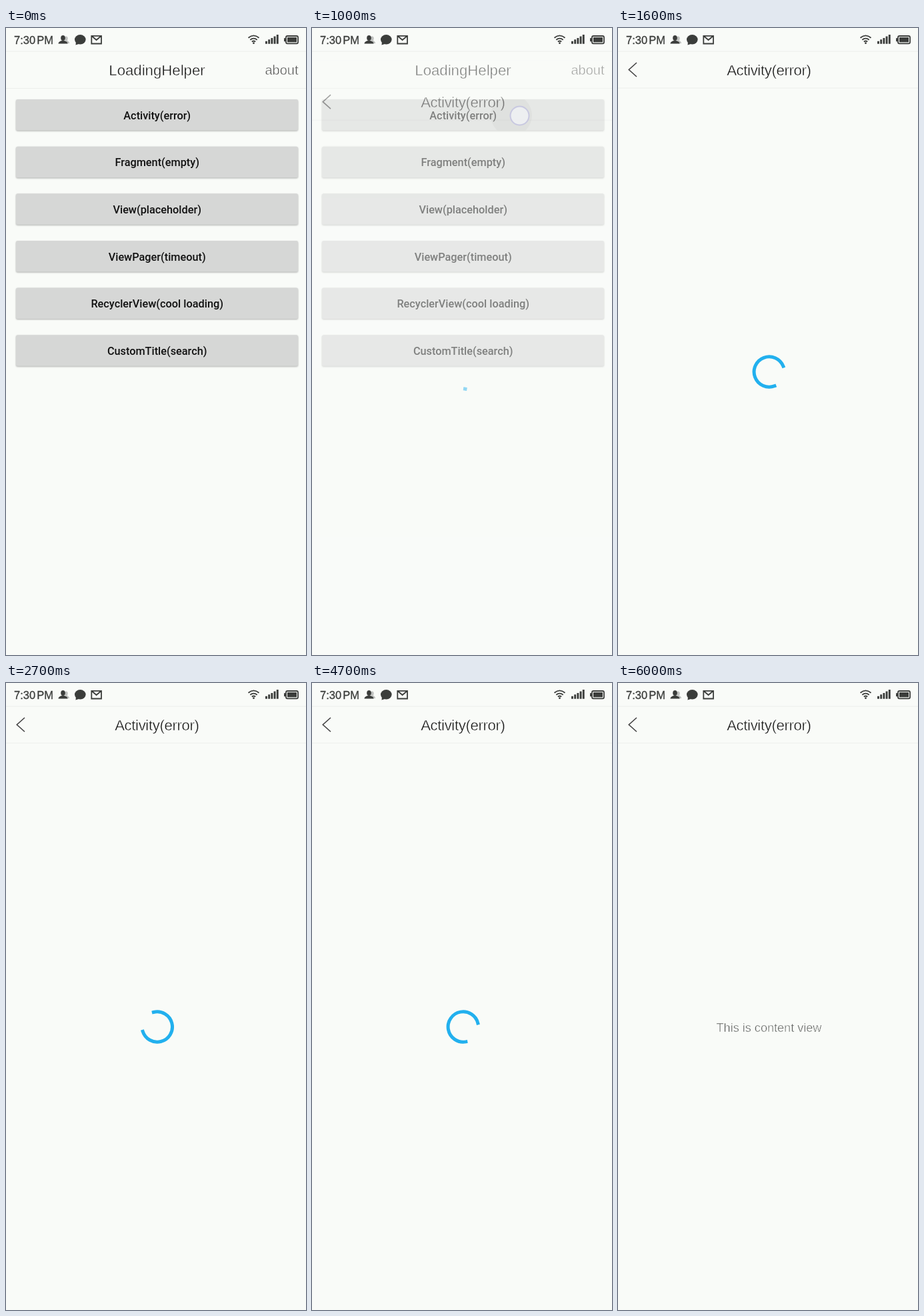
An HTML page for the animation above (7.9 s loop, 450x940 px).

```html
<!DOCTYPE html>
<html lang="en">
<head>
<meta charset="utf-8">
<title>LoadingHelper</title>
<style>
  html, body { margin: 0; width: 100%; height: 100%; overflow: hidden; background: #f9fbf8; }
  svg { display: block; width: 100vw; height: 100vh; }
  text { font-family: "Liberation Sans", Arial, sans-serif; text-anchor: middle; }
  /* a hairline in the page colour thins the letters to a light weight */
  .light { stroke: #f9fbf8; stroke-width: .5px; }
  .title { font-size: 22.2px; fill: #111; }
  .body { font-size: 18.1px; fill: #5c5e5c; }
  .button text { font: 500 16.3px Roboto, sans-serif; fill: #111; }
  .button rect { fill: #d6d7d6; filter: drop-shadow(0 1.5px 1px rgba(0, 0, 0, .3)); }
  .rule { stroke: #eceeec; }
  .clock { font-size: 16.5px; text-anchor: start; fill: #3b3d3b; stroke: #3b3d3b; stroke-width: .3px; }
</style>
</head>
<body>
<svg viewBox="0 0 450 940" preserveAspectRatio="none">
  <defs>
    <clipPath id="firstButton"><rect x="15" y="107" width="423" height="46.5" rx="2.5"/></clipPath>
  </defs>

  <g id="menu">
    <path class="rule" d="M0 90.5H450"/>
    <text class="title light" x="226.5" y="71">LoadingHelper</text>
    <text class="light" x="438.5" y="70" style="text-anchor:end;font-size:20px;fill:#555">about</text>
    <g id="buttons"></g>
    <circle id="ripple" cx="299" cy="131" r="31" fill="#000" opacity=".06" clip-path="url(#firstButton)"/>
  </g>

  <g id="page">
    <rect width="450" height="940" fill="#f9fbf8"/>
    <path class="rule" d="M0 90H450"/>
    <path d="M28 52L16.3 62.5L28 73" fill="none" stroke="#444" stroke-width="1.6"/>
    <text class="title light" x="226.3" y="71" letter-spacing="-.37">Activity(error)</text>
    <circle id="spinner" cx="226.8" cy="515.5" r="22.7" pathLength="360" fill="none"
      stroke="#22b0ee" stroke-width="5" stroke-linecap="square"/>
    <g id="error">
      <circle cx="226.8" cy="478" r="25" fill="#848684"/>
      <path d="M224.3 465.5h5v15h-5zm0 20h5v5h-5z" fill="#f9fbf8"/>
      <text class="body light" x="229.5" y="538.3">Failured to load</text>
      <rect x="181.7" y="554.5" width="90" height="29" rx="5" fill="none" stroke="#a9aba9" stroke-width="1.3"/>
      <text class="light" x="226.7" y="575" style="font-size:15.8px;fill:#888a88">Retry</text>
    </g>
    <text id="content" class="body light" x="226.5" y="523.3">This is content view</text>
  </g>

  <circle id="touch" cx="311.5" cy="131.5" r="14" fill="#f0f1f5" fill-opacity=".85" stroke="#c8c8e0" stroke-width="2"/>

  <g id="status" fill="#3b3d3b">
    <path class="rule" d="M0 35H450"/>
    <text class="clock" x="12" y="23.7">7:30</text>
    <text class="clock" x="46.3" y="23.7">PM</text>
    <g fill="#bfc1bf">
      <ellipse cx="90" cy="15.8" rx="2.7" ry="3.3"/>
      <path d="M89 23q0-4 2-4.5q4 1.500 4 4.500z"/>
    </g>
    <ellipse cx="85.500" cy="15" rx="3.300" ry="4"/>
    <path d="M78.500 23.500q0-3 5-4.500h4q5 1.500 5 4.500z"/>
    <ellipse cx="111.300" cy="17.300" rx="8.300" ry="7.200"/>
    <path d="M105 20l-.5 5.500 6-2z"/>
    <path d="M128.300 11.800h14.700v11.700h-14.700zl7.300 6.200 7.400-6.200" fill="none" stroke="#3b3d3b" stroke-width="1.800"/>
    <g fill="none" stroke="#3b3d3b" stroke-width="1.800">
      <path d="M363.500 14.700q8-6.600 16 0M366.300 17.700q5.200-4.200 10.400 0M368.800 20.500q2.700-2 5.400 0"/>
      <rect x="420" y="12" width="18" height="11.300" rx="2"/>
    </g>
    <circle cx="371.500" cy="22.700" r="1.400"/>
    <rect x="422" y="14" width="14" height="7.300"/>
    <rect x="417" y="15.200" width="2.500" height="5"/>
    <path id="signal"/>
  </g>
</svg>
<script>
const LOOP = 7900, STEP = 100;
const CLOCK = 1.1;
const OPEN = 973, ERROR = 2800, RETRY = 4045, CONTENT = 5900;
const $ = id => document.getElementById(id);

const labels = ['Activity(error)', 'Fragment(empty)', 'View(placeholder)',
  'ViewPager(timeout)', 'RecyclerView(cool loading)', 'CustomTitle(search)'];
$('buttons').innerHTML = labels.map((label, i) => `
  <g class="button" transform="translate(0 ${107 + i * 70.65})">
    <rect x="15" width="423" height="46.5" rx="2.5"/>
    <text x="226.7" y="29.8">${label}</text>
  </g>`).join('');

$('signal').setAttribute('d', [0, 1, 2, 3, 4].map(i => {
  const height = 4 + i * 2.4;
  return `M${389 + i * 4.2} ${23.7 - height}h2.900v${height}h-2.900z`;
}).join(''));

const clamp = x => Math.min(1, Math.max(0, x));

// cubic-bezier(.4, 0, .2, 1)
function ease(x) {
  let low = 0, high = 1;
  for (let i = 0; i < 24; i++) {
    const u = (low + high) / 2, v = 1 - u;
    if (1.2 * u * v * v + .6 * u * u * v + u ** 3 < x) low = u; else high = u;
  }
  return low * low * (3 - 2 * low);
}

function show(id, visible) {
  $(id).style.display = visible ? '' : 'none';
}

// Material indeterminate ring: trim, offset and steady rotation combined
function drawSpinner(elapsed) {
  const phase = elapsed / 1333 % 1;
  const tail = 270 * ease(clamp(2 * phase - 1));
  const head = 270 * ease(clamp(2 * phase));
  const angle = tail + 90 * phase + 720 * elapsed / 4444 - 90;
  $('spinner').setAttribute('stroke-dasharray', `${Math.max(.1, head - tail)} 720`);
  $('spinner').setAttribute('transform', `rotate(${angle} 226.8 515.5)`);
}

function render(t) {
  const opening = (t - OPEN) * CLOCK;
  const pressed = t >= 900 && t < 1100;
  const failed = t >= ERROR && t < RETRY;
  const done = t >= CONTENT;

  show('page', opening >= 0);
  show('menu', opening < 200);
  show('touch', pressed);
  show('ripple', pressed);
  show('error', failed);
  show('content', done);
  show('spinner', !failed && !done);

  const shift = 75 * (1 - clamp(opening / 350)) ** 5;
  $('page').setAttribute('transform', `translate(0 ${shift})`);
  $('page').setAttribute('opacity', 1 - (1 - clamp(opening / 200)) ** 4);
  drawSpinner(Math.max(0, t < RETRY ? opening : (t - RETRY) * CLOCK));
}

function tick() {
  const t = performance.now() % LOOP;
  render(Math.floor(t / STEP) * STEP);
  requestAnimationFrame(tick);
}
tick();
</script>
</body>
</html>
```
